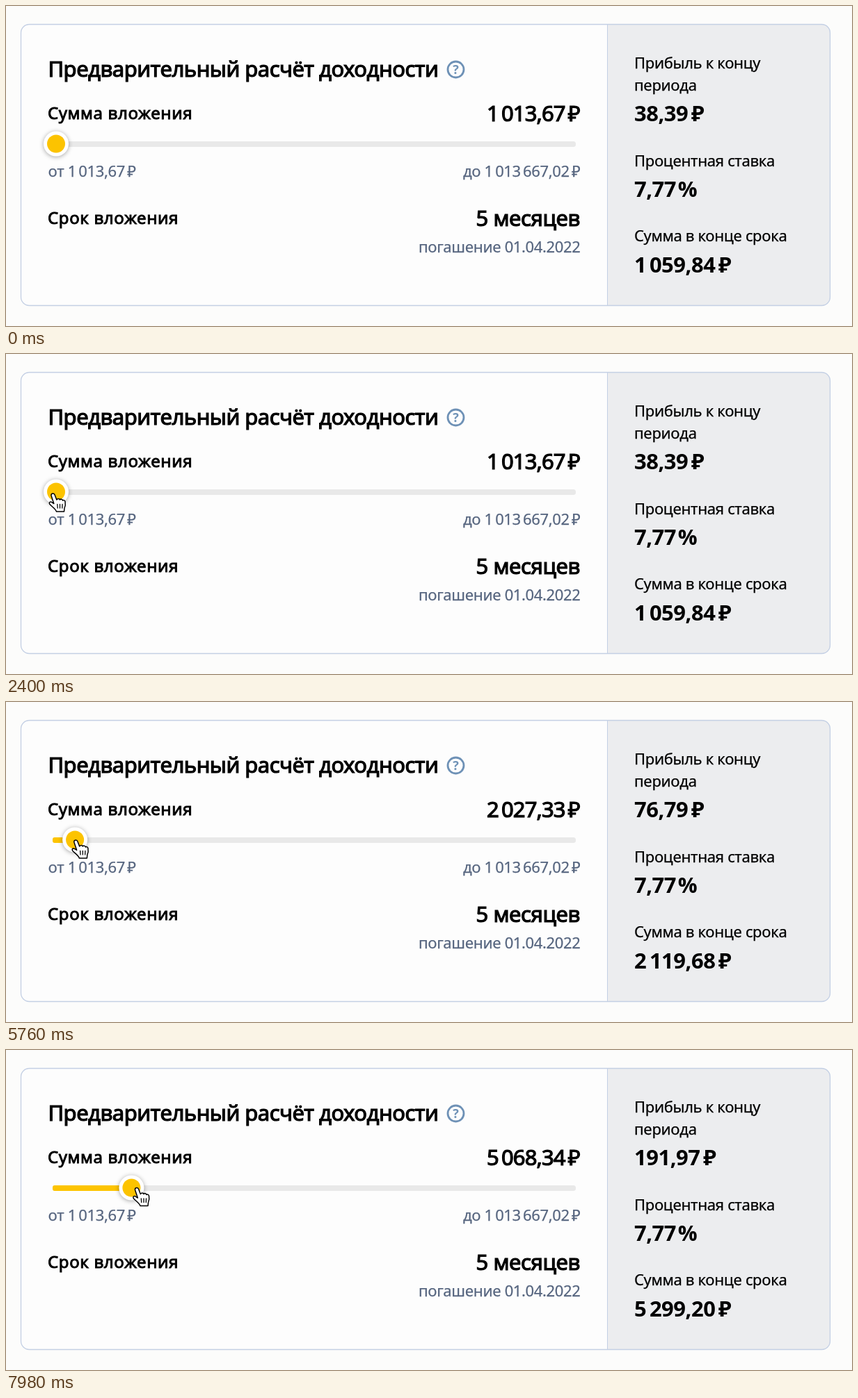
Recreate the animation shown at these times as an HTML page. Size 1216 by 461 pixels, loop 8000 ms.

```html
<!DOCTYPE html>
<html lang="ru">
<head>
<meta charset="utf-8">
<style>
html, body { margin: 0; width: 100%; height: 100%; overflow: hidden; background: #fcfcfb; }
svg { display: block; width: 1216px; height: 461px; }
text { font-family: "Noto Sans", "Open Sans", sans-serif; white-space: pre; }
.title, .big { font-size: 31px; stroke: #000; stroke-width: 1.2px; }
.title { letter-spacing: -.55px; }
.big { letter-spacing: -.9px; }
.term { letter-spacing: -.45px; }
.head { font-size: 24px; letter-spacing: .6px; stroke: #000; stroke-width: .95px; }
.note, .label { font-size: 22px; letter-spacing: -.36px; stroke-width: .25px; }
.label { stroke: #000; }
.note { fill: #56657f; stroke: #56657f; }
.sum { font-size: 31px; font-weight: 700; letter-spacing: -.5px; }
.end { text-anchor: end; }
#knob { filter: drop-shadow(0 1px 3px rgba(0, 0, 0, .35)); }
#pointer path { stroke-linejoin: round; stroke-linecap: round; }
</style>
</head>
<body>
<svg viewBox="0 0 1216 461">
  <rect x="21.5" y="26.5" width="1163" height="405" rx="12" fill="#fdfdfd"/>
  <path d="M865 26.5H1172.5a12 12 0 0 1 12 12V419.5a12 12 0 0 1-12 12H865Z" fill="#ecedef"/>
  <path d="M864.5 27V431" stroke="#c3cfe4"/>
  <rect x="21.5" y="26.5" width="1163" height="405" rx="12" fill="none" stroke="#c3cfe4" stroke-width="1.3"/>

  <text class="title" x="60.5" y="102">Предварительный расчёт доходности</text>
  <circle cx="646.5" cy="91.5" r="11.5" fill="none" stroke="#6e91b6" stroke-width="2.8"/>
  <text x="646.5" y="98" font-size="18" font-weight="700" fill="#6e91b6" text-anchor="middle">?</text>

  <text class="head" x="60" y="162.5">Сумма вложения</text>
  <text class="big end" id="invested" x="825" y="166"></text>
  <rect x="67" y="195" width="752" height="8" rx="3.5" fill="#e9e9e9"/>
  <rect id="bar" x="67" y="195" height="8" rx="3" fill="#fdc400"/>
  <g id="knob">
    <circle r="18" fill="#fff"/>
    <circle r="13" fill="#fcc300"/>
  </g>
  <text class="note" x="60.5" y="246">от 1&#8201;013,67&#8201;₽</text>
  <text class="note end" x="825.5" y="246">до 1&#8201;013&#8201;667,02&#8201;₽</text>

  <text class="head" x="60" y="313.5">Срок вложения</text>
  <text class="big term end" x="825" y="317">5 месяцев</text>
  <text class="note end" x="825.5" y="355">погашение 01.04.2022</text>

  <text class="label" x="903" y="90">Прибыль к концу</text>
  <text class="label" x="903" y="122">периода</text>
  <text class="sum" id="profit" x="903" y="166"></text>
  <text class="label" x="903" y="231">Процентная ставка</text>
  <text class="sum" x="903" y="275">7,77&#8202;%</text>
  <text class="label" x="903" y="339">Сумма в конце срока</text>
  <text class="sum" id="total" x="903" y="384"></text>

  <g id="pointer">
    <path id="arrow" d="M0 0V19L4.5 15L8 23L11.5 21.5L8 14H14Z" fill="#000" stroke="#fff" stroke-width="1.3"/>
    <g id="beam" fill="none">
      <path d="M-5-11Q0-11 0-8Q0-11 5-11M0-8V8M-5 11Q0 11 0 8Q0 11 5 11M-3 2H3" stroke="#fff" stroke-width="3.4"/>
      <path d="M-5-11Q0-11 0-8Q0-11 5-11M0-8V8M-5 11Q0 11 0 8Q0 11 5 11M-3 2H3" stroke="#000" stroke-width="1.5"/>
    </g>
    <g id="hand" stroke="#000" stroke-width="1.5">
      <path d="M-4.5 2C-5-1.5-.7-2 .5 .8L3.3 8C4.5 6 7.5 6 8 8C9 6.5 11.5 7 12 9C13.5 8 15.5 9 15.5 11C16.5 16 15.5 18 14.5 20L14 25H3C1.5 20.5-3.5 18-6.5 14.5C-8.5 11.5-5.5 9.8-3 12L-.7 13.5Z" fill="#fff"/>
      <path d="M4.3 14.5L4.7 20M8 14.5V20M11.5 14.5L11.3 20" fill="none" stroke-width="1.3"/>
    </g>
  </g>
</svg>
<script>
const LOOP = 8000, START = 72, STEP = 27.1, KNOB_Y = 198.5, ENTER = 900, GRAB = 2200;
const $ = id => document.getElementById(id);

// Pointer path: time, x, y
const path = [
  [ENTER, 150, 468], [1200, 128, 372], [1520, 106, 294], [1900, 80, 222],
  [2200, 70, 203], [2400, 69.5, 202], [3240, 70, 202], [3940, 72, 200.5],
  [4180, 74, 200], [4780, 96, 199.5], [5860, 103, 200], [6260, 113, 200],
  [6700, 138, 200], [7440, 160, 199.5], [7980, 190, 199.5], [LOOP, 190, 199.5]
];

function pointerAt(t) {
  const i = Math.max(1, path.findIndex(p => p[0] >= t));
  const [a, b] = [path[i - 1], path[i]];
  const k = Math.max(0, (t - a[0]) / (b[0] - a[0]));
  return [a[1] + (b[1] - a[1]) * k, a[2] + (b[2] - a[2]) * k];
}

function money(value) {
  const [whole, cents] = value.toFixed(2).split('.');
  return whole.replace(/\B(?=(\d{3})+$)/g, '\u2009') + ',' + cents + '\u2009₽';
}

function cursorKind(x, y, knobX, t) {
  if (t >= GRAB || Math.hypot(x - knobX, y - KNOB_Y) < 18) return 'hand';
  const overText = [[228, 252], [287, 322]].some(([top, bottom]) => y > top && y < bottom);
  return overText ? 'beam' : 'arrow';
}

function draw(t) {
  const [x, y] = pointerAt(t);
  const steps = t < GRAB ? 0 : Math.max(0, Math.round((x - START) / STEP));
  const knobX = START + steps * STEP;
  const lots = steps + 1;

  $('knob').setAttribute('transform', `translate(${knobX} ${KNOB_Y})`);
  $('bar').setAttribute('width', knobX - 67);
  $('invested').textContent = money(1013.66702 * lots);
  $('profit').textContent = money(38.394 * lots);
  $('total').textContent = money(1059.84 * lots);

  const kind = cursorKind(x, y, knobX, t);
  for (const id of ['arrow', 'beam', 'hand']) $(id).style.display = id === kind ? '' : 'none';
  $('pointer').style.display = t < ENTER ? 'none' : '';
  $('pointer').setAttribute('transform', `translate(${x} ${y})`);
}

const begin = performance.now();
function tick() {
  draw((performance.now() - begin) % LOOP);
  requestAnimationFrame(tick);
}
tick();
</script>
</body>
</html>
```
